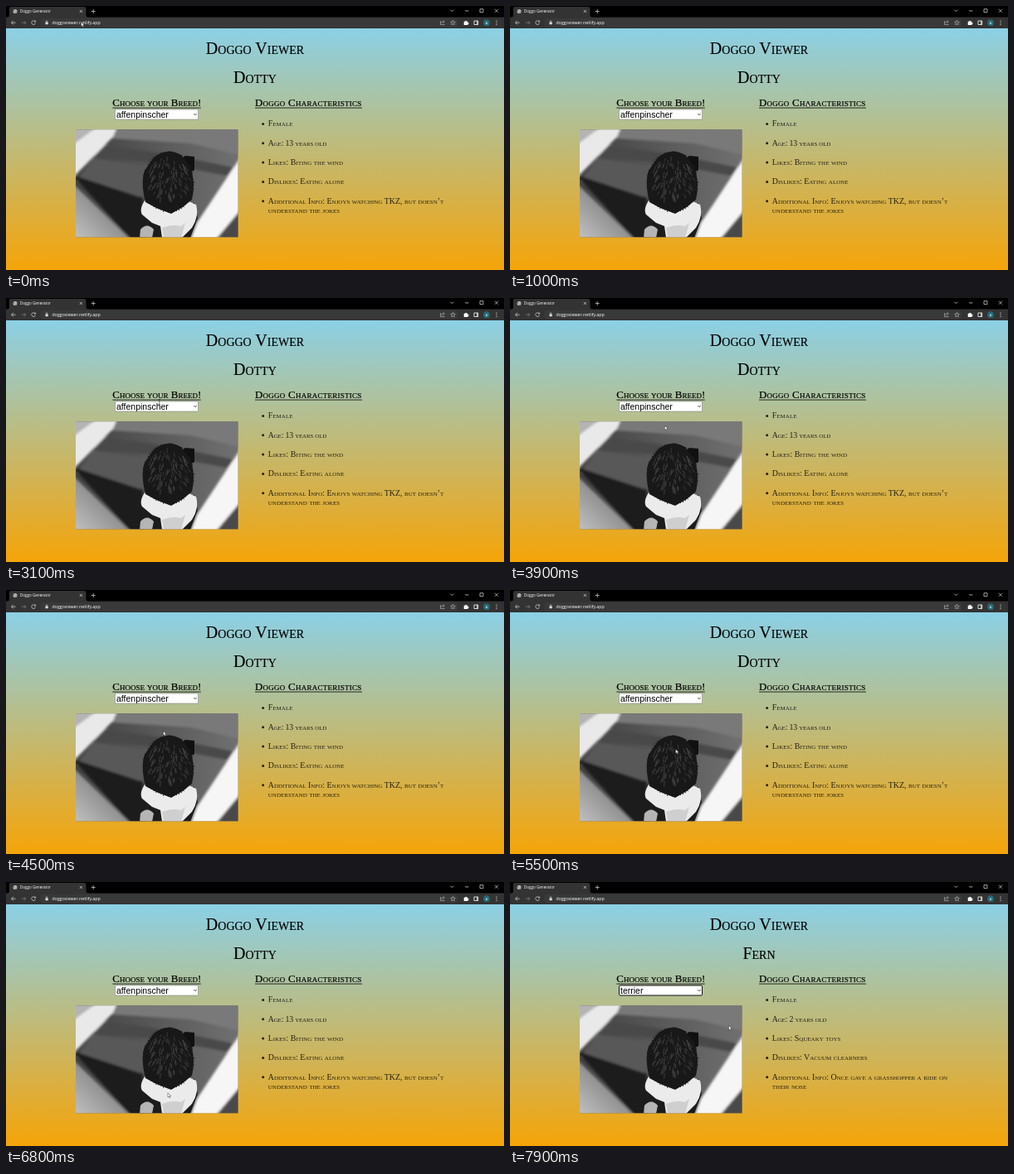
These frames come from a looping animation (600 px wide and 319 px high, 8 s). An HTML page:

```html
<!DOCTYPE html>
<html lang="en">
<head>
<meta charset="utf-8">
<title>Doggo Generator</title>
<style>
html, body { margin: 0; width: 100%; height: 100%; overflow: hidden; background: #000; }
svg { display: block; width: 100%; height: 100%; }
.ui { font-family: "Open Sans", "Noto Sans", sans-serif; fill: #fff; }
.sc { font-family: "Liberation Serif", "Times New Roman", serif; font-variant: small-caps; }
.head { font-size: 20px; text-anchor: middle; stroke: #000; stroke-width: .15; }
.sub { font-size: 12.9px; stroke: #000; stroke-width: .2; }
.item { font-size: 9.95px; fill: #000; fill-opacity: .82; }
.pick { font: 10.5px "Liberation Sans", Arial, sans-serif; }
.icon { fill: none; stroke: #dedede; stroke-width: .7; }
</style>
</head>
<body>
<svg viewBox="0 0 600 319" preserveAspectRatio="none">
  <defs>
    <linearGradient id="sky" x1="0" y1="0" x2="0" y2="1">
      <stop offset="0" stop-color="#8bd0e6"/><stop offset="1" stop-color="#f5a408"/>
    </linearGradient>
    <linearGradient id="carpet" x1="0" y1="0" x2="1" y2="0">
      <stop offset="0" stop-color="#414141"/><stop offset="1" stop-color="#707070"/>
    </linearGradient>
    <linearGradient id="wall" x1="0" y1="1" x2=".75" y2=".25">
      <stop offset="0" stop-color="#c4c4c4"/><stop offset="1" stop-color="#777"/>
    </linearGradient>
    <clipPath id="frame"><rect x="84" y="149.3" width="195.5" height="130"/></clipPath>
    <filter id="soft" x="-10%" y="-10%" width="120%" height="120%"><feGaussianBlur stdDeviation="1.8"/></filter>
  </defs>

  <rect y="27" width="600" height="292" fill="url(#sky)"/>

  <!-- browser window -->
  <rect width="600" height="14" fill="#000"/>
  <path d="M0 13.5H2Q4 13.5 4 11V3Q4 1 6 1H94Q96.5 1 96.5 3V11Q96.5 13.5 99 13.5H600V27H0Z" fill="#333"/>
  <rect x="41" y="14.8" width="504" height="11" rx="5.5" fill="#393939"/>
  <g class="icon">
    <circle cx="11" cy="6.5" r="2.5" fill="#c4c4c4" stroke="none"/>
    <path d="M9 6.5L11 5.3M11 8.5L13 6.3" stroke="#4a4a4a" stroke-width=".8"/>
    <path d="M88.8 4.8l3.200 3.200m0-3.200l-3.200 3.200M102.700 6.500h5M105.200 4v5"/>
    <path d="M535.200 4.600l2 2 2-2M553 5.900h4.500M571 3.700h4v4h-4ZM588.900 3.700l4 4m0-4l-4 4"/>
    <path d="M11.700 20.200H6.600m2.300-2.400L6.500 20.200l2.400 2.400"/>
    <path d="M18.700 20.200h5.100m-2.300-2.400l2.400 2.400-2.400 2.400" stroke="#858585"/>
    <path d="M35.300 18.900a2.400 2.400 0 1 0 .2 1.900M35.600 17.500v1.700h-1.800"/>
    <path d="M48.200 19.700v-.8a.9 .9 0 0 1 1.800 0v.8"/>
    <rect x="47.500" y="19.600" width="3.200" height="2.600" rx=".4" fill="#dedede" stroke="none"/>
    <path d="M524.700 18.600h-1.200v4h4.600v-1.200M525 21q.2-2.300 3-2.300m-1.300-1.300l1.400 1.300-1.400 1.400" stroke-width=".5"/>
    <path d="M538.500 17.400l.8 1.800 2 .2-1.500 1.300.4 2-1.700-1-1.700 1 .4-2-1.500-1.300 2-.2Z" stroke-width=".5"/>
    <path d="M551.700 18.800h1.500a1 1 0 0 1 2 0h1.300v1.300a1 1 0 0 1 0 2v1h-4.800Z" fill="#fff" stroke="none"/>
    <path d="M564 18h4.700v4.500H564ZM567.700 18v4.500" stroke="#fff" stroke-width=".8"/>
    <circle cx="579" cy="20.200" r="3.900" fill="#246a78" stroke="none"/>
    <path d="M591 17.500v1.100m0 1.100v1.100m0 1.100v1.100" stroke-width="1.100"/>
  </g>
  <g class="ui">
    <text x="16.800" y="8.200" font-size="4.600">Doggo Generator</text>
    <text x="55.500" y="22.100" font-size="5.250">doggoviewer.netlify.app</text>
    <text x="579" y="21.700" font-size="4" text-anchor="middle">A</text>
  </g>

  <!-- page -->
  <g class="sc">
    <text class="head" x="300" y="58.200">Doggo Viewer</text>
    <text class="head" x="300" y="93.400" id="dog"></text>
    <text class="sub" x="128.300" y="121.300">Choose your Breed!</text>
    <text class="sub" x="300" y="121.300" letter-spacing=".26">Doggo Characteristics</text>
    <path d="M128.300 123.100h106.500M300 123.100h129" stroke="#000" stroke-width=".8"/>
    <g id="list" class="item"></g>
  </g>
  <rect id="box" x="131.500" y="125" width="100" height="12" fill="#fff"/>
  <text id="breed" class="pick" x="133" y="134.700"></text>
  <path d="M226.300 130l1.700 1.800 1.700-1.800" fill="none" stroke="#222" stroke-width=".8"/>

  <!-- picture -->
  <g clip-path="url(#frame)">
    <rect x="84" y="149" width="196" height="131" fill="url(#carpet)"/>
    <g filter="url(#soft)">
      <path d="M128 147H282V180L222 166 126 160Z" fill="#797979"/>
      <path d="M118 168L190 178 282 197V208L185 190 106 182Z" fill="#4a4a4a"/>
      <path d="M106 184L172 194 160 236 84 212Z" fill="#595959"/>
      <path d="M80 204L165 232V282H150Z" fill="#1c1c1c"/>
      <path d="M80 214L150 282H80Z" fill="url(#wall)"/>
      <path d="M80 146H134L129 158 80 208Z" fill="#e9e9e9"/>
      <path d="M80 146H110L80 168Z" fill="#b4b4b4"/>
      <path d="M283 182V250L254 283H222L230 262Z" fill="#f6f6f6"/>
      <path d="M283 246V283H252Z" fill="#4a4a4a"/>
    </g>
    <path d="M166 240Q159 254 161 280H222L231 256 227 238Z" fill="#1c1c1c"/>
    <path d="M168 234Q160 245 164 252L176 262 186 266 188 280H212L224 268Q233 254 229 240L218 235Z" fill="#ebebeb"/>
    <path d="M188 268Q200 263 211 266L216 262 211 280H190Z" fill="#cfcfcf"/>
    <path d="M162 270Q170 261 178 270L176 280H161Z" fill="#b5b5b5"/>
    <path d="M207 187L216 181 227 182 227 198 221 202Z" fill="#101010"/>
    <path d="M178 183Q194 170 211 180L222 194Q229 214 224 234L213 243 199 251 181 244 168 237Q162 213 167 199Z" fill="#181818"/>
    <path id="fur" fill="none" stroke="#4b4b4b" stroke-width=".7"/>
    <path id="tuft" fill="none" stroke="#181818" stroke-width="1"/>
  </g>

  <path id="arrow" d="M0 0V5.300L1.200 4.200 2 6 2.900 5.600 2.100 3.900H3.800Z" fill="#fff" stroke="#111" stroke-width=".4"/>
  <path id="beam" d="M-1.300-3H-.3L0-2.700.3-3H1.300M0-2.700V2.700M-1.300 3H-.3L0 2.700.3 3H1.300" fill="none" stroke="#222" stroke-width=".6"/>
</svg>
<script>
const el = id => document.getElementById(id);
const LOOP = 8000, STEP = 100, PICKED = 7700;

const dogs = [
  { name: "Dotty", breed: "affenpinscher", facts: ["Female", "Age: 13 years old", "Likes: Biting the wind",
    "Dislikes: Eating alone", "Additional Info: Enjoys watching TKZ, but doesn\u2019t", "understand the jokes"] },
  { name: "Fern", breed: "terrier", facts: ["Female", "Age: 2 years old", "Likes: Squeaky toys",
    "Dislikes: Vacuum clearners", "Additional Info: Once gave a grasshopper a ride on", "their nose"] }
];

// time, x, y of the pointer
const path = [
  [0, 90.5, 19.5], [300, 93, 21], [1200, 396, 131], [1400, 396, 131], [2000, 396.8, 132.7],
  [2200, 396.8, 132.7], [3100, 184.8, 125.5], [3400, 184, 131], [4100, 187, 160],
  [4500, 189.5, 170.5], [5500, 199.5, 192.3], [5900, 198, 225], [6300, 196, 300],
  [6800, 195, 254.8], [7500, 196, 245], [7900, 263.5, 173.5], [8000, 263.5, 173.5]
];

function pointer(t) {
  let i = 1;
  while (path[i][0] < t) i++;
  const [t0, x0, y0] = path[i - 1], [t1, x1, y1] = path[i];
  const u = (t - t0) / (t1 - t0), k = u * u * (3 - 2 * u);
  return [x0 + (x1 - x0) * k, y0 + (y1 - y0) * k];
}

function listMarkup(facts) {
  return facts.map((text, i) => {
    const y = i < 5 ? 145.4 + 23.3 * i : 249.8;
    const dot = i < 5 ? `<circle cx="309.7" cy="${y - 2.9}" r="1.5"/>` : "";
    const gap = text.startsWith("Age") ? -.22 : 0;
    return `${dot}<text x="315.8" y="${y}" letter-spacing="${gap}">${text}</text>`;
  }).join("");
}

function drawFur() {
  let seed = 7;
  const rnd = () => (seed = seed * 16807 % 2147483647) / 2147483647;
  let fur = "", tuft = "";
  for (let i = 0; i < 110; i++) {
    const a = rnd() * Math.PI * 2, r = Math.sqrt(rnd());
    const x = 196 + 24 * r * Math.cos(a), y = 207 + 26 * r * Math.sin(a);
    fur += `M${x} ${y}q${(x - 196) * .1} 2 ${(x - 196) * .18} ${3 + rnd() * 4}`;
  }
  for (let i = 0; i < 60; i++) {
    const a = i / 60 * Math.PI * 2, len = 2 + rnd() * 3;
    const c = Math.cos(a), s = Math.sin(a);
    tuft += `M${196 + 27 * c} ${212 + 33 * s}l${c * len} ${s * len + 1}`;
  }
  el("fur").setAttribute("d", fur);
  el("tuft").setAttribute("d", tuft);
}

let shown = -1;
function showDog(n) {
  if (n === shown) return;
  shown = n;
  const dog = dogs[n], box = el("box");
  el("dog").textContent = dog.name;
  el("breed").textContent = dog.breed;
  el("list").innerHTML = listMarkup(dog.facts);
  box.setAttribute("stroke", n ? "#101010" : "#767676");
  box.setAttribute("stroke-width", n ? 1 : .5);
  box.setAttribute("rx", n ? 1.2 : 0);
}

function draw(now) {
  const t = Math.floor(now % LOOP / STEP) * STEP;
  showDog(t >= PICKED ? 1 : 0);
  const [x, y] = pointer(t);
  const overText = t >= 3000 && t < 3200;
  const move = `translate(${x} ${y})`;
  el("arrow").setAttribute("transform", move);
  el("beam").setAttribute("transform", move);
  el("arrow").setAttribute("visibility", overText ? "hidden" : "visible");
  el("beam").setAttribute("visibility", overText ? "visible" : "hidden");
}

drawFur();
let start;
function tick(now) {
  if (start === undefined) start = now;
  draw(Math.max(0, now - start));
  requestAnimationFrame(tick);
}
draw(0);
requestAnimationFrame(tick);
</script>
</body>
</html>
```
